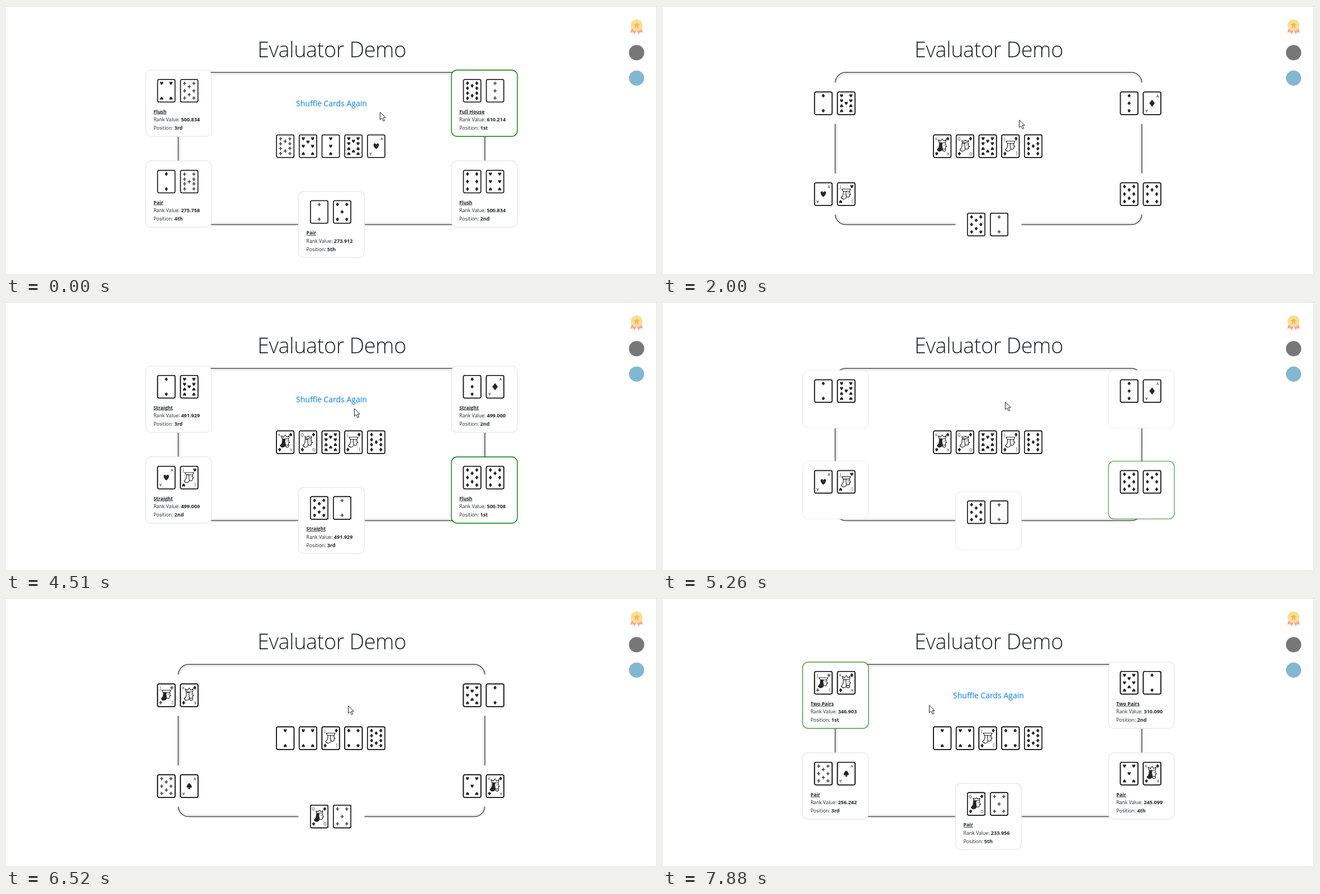
Write an HTML page that moves like this. It is 1165 by 481 pixels and loops after 8000 ms.

```html
<!DOCTYPE html>
<html lang="en">
<head>
<meta charset="utf-8">
<title>Evaluator Demo</title>
<style>
  html, body { margin: 0; width: 100%; height: 100%; overflow: hidden; background: #fff; }
  svg { display: block; width: 1165px; height: 481px; }
  text { font-family: "Open Sans", "Noto Sans", sans-serif; fill: #212529; }
  .title { font-size: 38px; font-weight: 300; letter-spacing: -.5px; text-anchor: middle; }
  .link { font-size: 14px; text-anchor: middle; fill: #007bff; }
  .link.hover { fill: #0056b3; }
  .info { font-size: 8.7px; }
  .info .name { font-weight: 700; text-decoration: underline; }
  .info tspan { font-weight: 700; font-size: 9.1px; }
  .card { fill: #fff; stroke: #262626; stroke-width: 1.8; }
  .pip, .dark { fill: #262626; }
  .letter { font-size: 7px; text-anchor: middle; fill: #262626; }
  .line { fill: none; stroke: #262626; stroke-width: 1.2; stroke-linejoin: round; stroke-linecap: round; }
  .panel { fill: #fff; stroke-width: 1.4; }
</style>
</head>
<body>
<svg id="stage" viewBox="0 0 1165 481">
  <path d="M0 .5H1165M1164.5 0V481" stroke="#dcdcdc"/>
  <text class="title" x="583" y="92">Evaluator Demo</text>
  <rect x="310.5" y="121.5" width="544" height="269" rx="17" fill="none" stroke="#eee" stroke-width="4"/>
  <rect x="308.2" y="119.2" width="548.8" height="273.2" rx="19" fill="none" stroke="#606060" stroke-width="1.8"/>
  <path d="M1120 39L1117 48L1122 47L1125 51L1128.5 44L1132 51L1135 47L1140 48L1137 39Z" fill="#f4aaa2"/>
  <circle cx="1128.5" cy="34.5" r="10.6" fill="#fbdf92"/>
  <path id="star" fill="#f3b765"/>
  <circle cx="1128.5" cy="83.7" r="13.7" fill="#777"/>
  <circle cx="1128.5" cy="129.3" r="13.6" fill="#82b7d1"/>
  <text class="link" id="link" x="582.5" y="180">Shuffle Cards Again</text>
  <g id="table"></g>
  <g id="pointer" fill="#fff" stroke="#222" stroke-width="1" stroke-linejoin="round">
    <path id="arrow" d="M.5 .5V14L3.8 11L6.3 16.6L8.6 15.6L6.2 10.2H10.4Z"/>
    <path id="hand" d="M-1.5 10V1.5Q0 -.5 1.5 1.5V6.5L8 8Q9.5 8.5 9 11L8 16H.5L-4.5 10.5Q-4.5 8.5 -1.5 10Z"/>
  </g>
</svg>
<script>
const LOOP = 8000, FULL = 119, SMALL = 74;
const $ = id => document.getElementById(id);

// Moments at which the screen refreshes.
const TICKS = [0, 110, 250, 360, 610, 880, 1000, 1130, 1250, 1370, 1610, 1760, 1860, 2000,
  3260, 3380, 3500, 3620, 3750, 3870, 4510, 4610, 4760, 5120, 5260, 5380, 5500, 5620,
  5880, 6000, 6120, 6270, 6370, 6520, 6620, 7370, 7520, 7640, 7760, 7880];

// Panel left edge and vertical centre.
const SEATS = [[249.6, 174.5], [796.9, 174.5], [249.6, 337.5], [796.9, 337.5], [523.2, 392]];

const ROUNDS = [
  { swap: -1000, open: -1000, show: 0, close: 893, hide: 880, board: 'TC 7H 3H TH AH', hands: [
    '4H 8C|Flush|500.834|3rd', 'TD 3C|Full House|610.214|1st', '2D 9C|Pair|275.758|4th',
    '6D 6H|Flush|500.834|2nd', '2C 5S|Pair|273.912|5th'] },
  { swap: 1680, open: 3123, show: 3260, close: 5150, hide: 5260, board: 'KS QD TH JD 9D', hands: [
    '2S 9H|Straight|491.929|3rd', '3S AD|Straight|499.000|2nd', 'AH JH|Straight|499.000|2nd',
    '8D 7D|Flush|500.708|1st', '8S 2C|Straight|491.929|3rd'] },
  { swap: 5800, open: 7265, show: 7370, close: 1e5, hide: 1e5, board: '2H 4H JD 4S TS', hands: [
    'JC KD|Two Pairs|346.903|1st', '8H 2S|Two Pairs|310.090|2nd', '8C AS|Pair|256.242|3rd',
    '5H KS|Pair|245.099|4th', 'QS 5C|Pair|233.956|5th'] }
];

const SUIT = {
  H: 'M0 3C-4.2 -.2 -2.8 -3 -1.3 -2.8Q-.3 -2.6 0 -1.4Q.3 -2.6 1.3 -2.8C2.8 -3 4.2 -.2 0 3Z',
  D: 'M0 -3.7L2.8 0L0 3.7L-2.8 0Z',
  S: 'M0 -3.2C4.2 .4 2.6 2.6 .5 1.4L1.3 3.1H-1.3L-.5 1.4C-2.6 2.6 -4.2 .4 0 -3.2Z',
  C: 'M-.6 -2.9H.6V-.6H2.9V.7H.6V2.2H1.4V3H-1.4V2.2H-.6V.7H-2.9V-.6H-.6Z'
};

const HAT = {
  K: 'M11 15L9.5 9.5L13.5 12L16.5 8L19.5 12L23.5 9.5L22.5 15Z',
  Q: 'M12 15L11 11L14 12.5L17 10L20 12.5L23 11L22 15Z',
  J: 'M8.5 12H24.5L22.5 16H11Z'
};

const pip = (suit, x, y, scale = 1) =>
  `<path class="pip" d="${SUIT[suit]}" transform="translate(${x} ${y}) scale(${scale})${y > 22 ? ' rotate(180)' : ''}"/>`;

const letters = (ch, x) => [0, 180].map(a =>
  `<text class="letter" x="${x}" y="10" transform="rotate(${a} 16.5 21)">${ch}</text>`).join('');

function spots(n) {
  const L = 8.2, C = 16.5, R = 24.8;
  if (n < 4) return [[C, 7.5], [C, 34.5], ...(n === 3 ? [[C, 21]] : [])];
  const rows = n > 8 ? [7.5, 16.5, 25.5, 34.5] : n > 5 ? [7.5, 21, 34.5] : [7.5, 34.5];
  const mid = { 5: [21], 7: [13.5], 8: [13.5, 28.5], 9: [21], 10: [12, 30] }[n] || [];
  return [...rows.flatMap(y => [[L, y], [R, y]]), ...mid.map(y => [C, y])];
}

function portrait(rank, suit) {
  const hair = 'SC'.includes(suit) ? 'line dark' : 'line';
  const beard = rank === 'K' ? '<path class="line" d="M16.5 25Q17 31 21 30Q23.5 29 22.5 26"/>' : '';
  return `<path class="${hair}" style="${hair === 'line' ? '' : 'fill:#262626'}"
      d="M11.5 16C11.5 22 11 24 7.5 27C9 31 14.5 31 16.5 27.5C18 24 14.5 22 16.5 16Z"/>
    <path class="line" d="M22.5 16V19L24.5 22H22.5V25Q21 27.5 17.5 26M19.5 19H20.5"/>
    <path class="line" d="${HAT[rank]}"/>${beard}`;
}

function card([rank, suit], x, y) {
  let face;
  if (rank === 'A') face = letters('A', 26.5) + pip(suit, 16.5, 21, 1.75);
  else if ('KQJ'.includes(rank))
    face = letters(rank, 6) + pip(suit, 26.5, 7.5) + pip(suit, 6.5, 34.5) + portrait(rank, suit);
  else face = spots(rank === 'T' ? 10 : +rank).map(([px, py]) => pip(suit, px, py)).join('');
  return `<g transform="translate(${x} ${y})"><rect class="card" x=".9" y=".9" width="31.2" height="40.4" rx="2.5"/>${face}</g>`;
}

const cards = (list, x, y, gap) => list.split(' ').map((c, i) => card(c, x + i * gap, y)).join('');

function group(parent, html = '') {
  const g = document.createElementNS('http://www.w3.org/2000/svg', 'g');
  g.innerHTML = html;
  return parent.appendChild(g);
}

const table = $('table');
const boards = ROUNDS.map(r => group(table, cards(r.board, 483.2, 230.5, 40.7)));
const seats = SEATS.map(([x, cy], i) => {
  const root = group(table, '<rect class="panel" x=".2" width="118" rx="10"/>');
  const hands = ROUNDS.map(r => r.hands[i].split('|'));
  return {
    x, cy, root, rect: root.firstChild,
    first: hands.map(h => h[3] === '1st'),
    faces: hands.map(h => group(root, cards(h[0], 20.8, 16, 41))),
    infos: hands.map(h => group(root, `<g class="info"><text class="name" x="14.4" y="77.6">${h[1]}</text>
      <text x="14.4" y="92.2">Rank Value: <tspan>${h[2]}</tspan></text>
      <text x="14.4" y="107">Position: <tspan>${h[3]}</tspan></text></g>`))
  };
});

$('star').setAttribute('d', 'M' + Array.from({ length: 10 }, (_, i) => {
  const a = i * Math.PI / 5, r = i % 2 ? 2.7 : 6.4;
  return `${1128.5 + r * Math.sin(a)} ${34.5 - r * Math.cos(a)}`;
}).join('L') + 'Z');

const clamp = v => Math.min(1, Math.max(0, v));

// The CSS "ease" curve.
function ease(p) {
  p = clamp(p);
  let lo = 0, hi = 1;
  for (let i = 0; i < 24; i++) {
    const s = (lo + hi) / 2, q = 1 - s;
    if (.75 * q * s + s * s * s < p - 0 + 0 * q) lo = s; else hi = s;
  }
  const s = lo, q = 1 - s;
  return .3 * q * q * s + 3 * q * s * s + s * s * s;
}

// Time, x, y of the pointer tip.
const PATH = [[0, 669, 190], [110, 645, 182], [250, 629, 179], [1760, 629, 179], [2000, 637, 204],
  [3870, 637, 204], [4510, 623, 191], [4610, 613, 181], [5120, 612, 179], [6120, 612, 179],
  [6370, 612, 193], [7520, 612, 193], [7880, 476, 192], [LOOP, 476, 192]];

function pointerAt(t) {
  const i = PATH.findIndex(k => k[0] > t), a = PATH[i - 1], b = PATH[i];
  const p = (t - a[0]) / (b[0] - a[0]);
  return [a[1] + (b[1] - a[1]) * p, a[2] + (b[2] - a[2]) * p];
}

const show = (el, on) => { el.style.display = on ? '' : 'none'; };

function draw(t) {
  const now = ROUNDS.findLastIndex(r => t >= r.swap), round = ROUNDS[now];
  const visible = t >= round.show && t < round.hide;
  const fade = i => i > now ? 0 : clamp((t - ROUNDS[i].swap) / 320);
  const shut = ease((t - round.close) / 500);
  const grown = ease((t - round.open) / 500) * (1 - shut);
  const glow = ease((t - round.open - 500) / 240) * (1 - shut);

  boards.forEach((b, i) => b.setAttribute('opacity', fade(i)));
  for (const s of seats) {
    const first = s.first[now];
    const size = first && visible && t < round.close ? 1 : grown;
    const h = SMALL + (FULL - SMALL) * size;
    s.root.setAttribute('transform', `translate(${s.x} ${s.cy - h / 2})`);
    s.rect.setAttribute('height', h);
    s.rect.setAttribute('stroke', first ? '#008000' : '#e9e9e9');
    s.rect.setAttribute('stroke-opacity', first ? glow : grown);
    s.faces.forEach((f, i) => f.setAttribute('opacity', fade(i)));
    s.infos.forEach((f, i) => show(f, visible && i === now));
  }

  const hover = visible && (t >= 110 && t < 880 || t >= 4610 && t < 5260);
  show($('link'), visible);
  $('link').classList.toggle('hover', hover);
  const [x, y] = pointerAt(t);
  $('pointer').setAttribute('transform', `translate(${x} ${y})`);
  show($('arrow'), !hover);
  show($('hand'), hover);
}

const start = performance.now();
let last = -1;
function frame() {
  const t = (performance.now() - start) % LOOP;
  const tick = TICKS.findLast(k => k <= t);
  if (tick !== last) draw(last = tick);
  requestAnimationFrame(frame);
}
frame();
</script>
</body>
</html>
```
